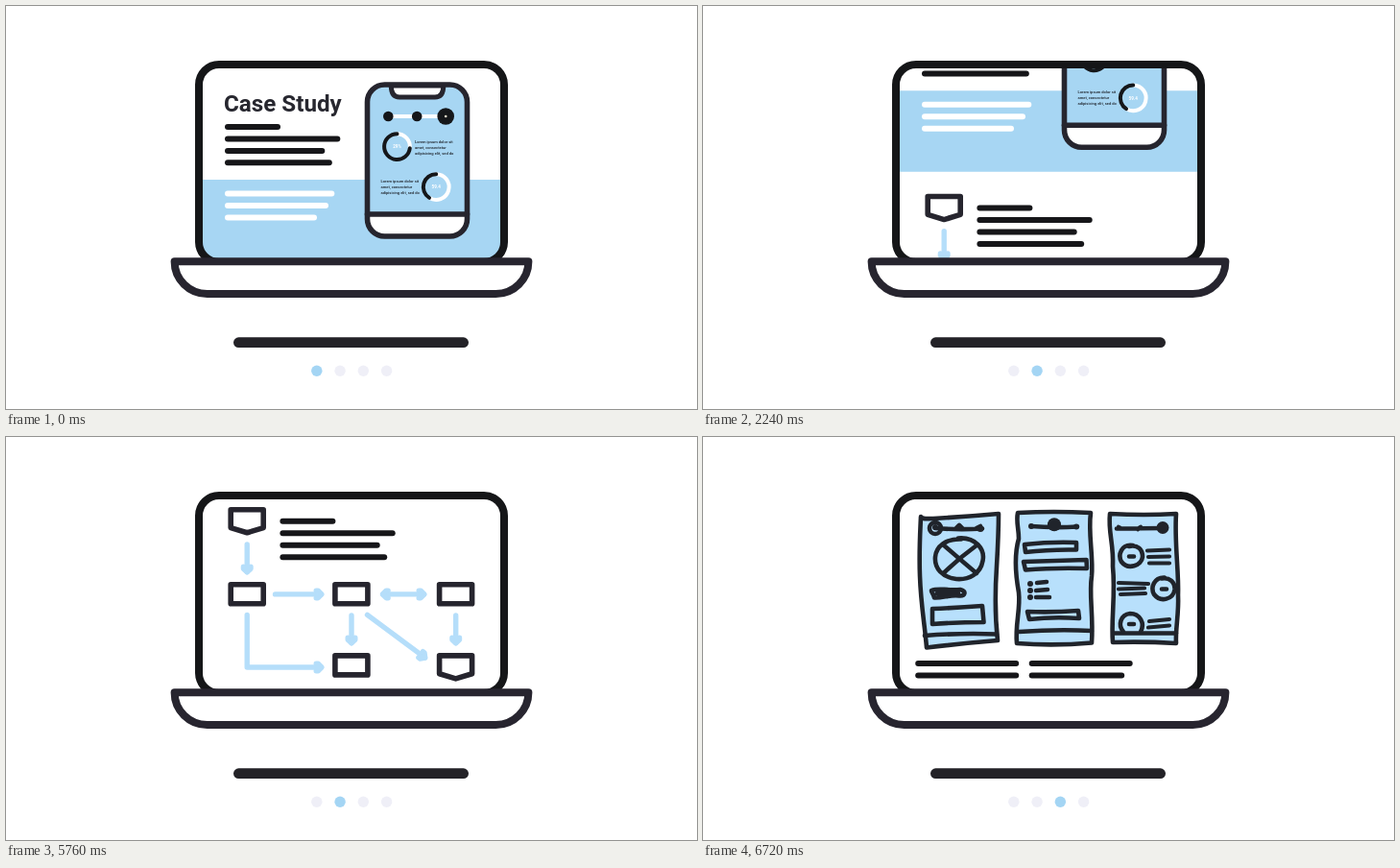
An HTML page for the animation above (8000 ms loop, 720x420 px).

```html
<!DOCTYPE html>
<html lang="en">
<head>
<meta charset="utf-8">
<title>Laptop case study</title>
<style>
  html, body { margin: 0; width: 100%; height: 100%; overflow: hidden; background: #fff; }
  svg { display: block; }
  path, line, circle, rect { stroke-linecap: round; stroke-linejoin: round; }
  .title { font: bold 24.2px Roboto, sans-serif; fill: #27272f; }
  .small { font: 500 4.05px Roboto, sans-serif; fill: #1b1f26; }
  .value { font: bold 4.6px Roboto, sans-serif; fill: #fff; text-anchor: middle; }
  .dark { fill: none; stroke: #26252e; stroke-width: 5.6; }
  .arrow { fill: none; stroke: #b5defa; stroke-width: 5.4; }
  .sketch { fill: none; stroke: #20242b; stroke-width: 4.6; }
  .card { fill: #b8e0fc; }
  .dot { fill: #20242b; }
</style>
</head>
<body>
<svg width="720" height="420" viewBox="0 0 720 420">
  <defs>
    <clipPath id="screen"><rect x="201" y="61" width="318" height="206" rx="21"/></clipPath>
    <path id="head" d="M-8.3-3.8h2L-2.6 0L-6.3 3.8h-2"/>
    <path id="box" d="M-17-10H17V10H-17Z"/>
    <path id="shield" d="M-17-10H17V8.8L0 14L-17 8.8Z"/>
  </defs>

  <g clip-path="url(#screen)">
    <g id="page">
      <g id="study">
        <rect x="200" y="181" width="320" height="84.5" fill="#a7d6f3"/>
        <text class="title" x="227" y="110.4">Case Study</text>
        <rect x="376.5" y="82" width="104" height="158" rx="18" fill="#fff"/>
        <path d="M376.5 217V100a18 18 0 0 1 18-18h68a18 18 0 0 1 18 18V217Z" fill="#a7d6f3"/>
        <path class="dark" d="M376.5 217H480.5"/>
        <path class="dark" style="fill:#fff;stroke-width:5" d="M401.3 83C401.3 91 404 95 410 95H447C453 95 455.8 91 455.8 83Z"/>
        <rect class="dark" x="376.5" y="82" width="104" height="158" rx="18"/>
        <path d="M398 115H458" stroke="#fff" stroke-width="4"/>
        <g fill="#15171a">
          <circle cx="398.3" cy="115" r="5.3"/>
          <circle cx="428.2" cy="115" r="5.3"/>
          <circle cx="458.2" cy="115" r="8.8"/>
        </g>
        <circle cx="458.2" cy="115" r="1.3" fill="#f3e9d0"/>
      </g>
      <g id="flow"></g>
      <g id="wire">
        <g class="sketch">
          <path class="card" d="M227 83C229 86 232 85 240 85Q275 83 308 80C308 100 307 118 306 135C304 165 304 185 307 212Q270 215 233 219.5C231 195 227 175 226 145C225 120 226 105 227 83Z"/>
          <path d="M231 207Q270 204 306 205.500M242 95Q266 97 291 95.500M264 95l3-3l3 3M285 95l4-2"/>
          <circle cx="242" cy="95" r="6"/>
          <path d="M266 105.500C284 104 294 117 291.500 129C289 143 277 149 264 148C249 146 241 137 242 125C243 114 253 106 269 106.500M250 112Q266 126 285 142M285 113Q267 126 250 142.500"/>
          <path d="M238 160C245 157 252 160 268 159C275 161 273 166 267 165.500C258 164 250 168 241 167.500C240 163 238 162 238 160ZM244 163H266"/>
          <path d="M239 179Q265 178 291 176L292.500 193Q265 193 239 195Z"/>

          <path class="card" d="M328 79Q365 77 404 79C401 100 407 125 405 145C402 165 407 185 405 214.500Q365 218 327 215C325 195 331 180 329 162C325 140 325 120 329 106C329 95 326 88 328 79Z"/>
          <path d="M329 203Q370 200 405 202M342 93Q365 95 390 93.500"/>
          <path d="M335 112Q362 109 389 110L389 117.500Q360 117 336 120ZM334 130Q370 129 399.500 128L400 137Q365 136 336 138.500Z"/>
          <path d="M348 152l10-1M347 160l12-1M347 167h14M338 182Q365 183 391 181L392 189Q365 187 340 190Z"/>

          <path class="card" d="M424 80Q460 82 493 80C491 110 496 140 495 165C496 185 492 200 493 215Q460 213 427 214C425 190 430 165 427 135C428 110 422 100 424 80Z"/>
          <path d="M428 204.500H493M431 95.500Q455 95 479 95M433 94l2 1M453 96l3-2"/>
          <path d="M448 113C436 111 432 123 436 130C443 139 457 134 458 125C458 117 453 112 444 114M444 124.500h5"/>
          <path d="M481 146.500C470 146 466 157 470 164C477 173 490 169 491.500 159C492 151 486 146 478 147.500M478 158.500h5"/>
          <path d="M438 203C432 196 435 185 445 184C455 184 461 194 456 203M444 195h5"/>
          <path style="stroke-width:4.200" d="M463 118.500l23-1M464 125l22-.5M465 131.500h21M433 152l31 1M433 158.500l27-1M435 164l26-1M465 192l21-2M464 198.500l22-2"/>
        </g>
        <g class="dot">
          <circle cx="242" cy="94" r="3"/><circle cx="267" cy="94.500" r="3"/><circle cx="289" cy="95.500" r="3.500"/>
          <circle cx="342" cy="93" r="3"/><circle cx="366" cy="91.300" r="7"/><circle cx="389" cy="93.500" r="3"/>
          <circle cx="341" cy="153" r="3"/><circle cx="341" cy="160" r="3"/><circle cx="341" cy="167" r="3"/>
          <circle cx="479" cy="94.500" r="6.500"/>
        </g>
      </g>
    </g>
  </g>

  <rect x="201" y="61" width="318" height="206" rx="21" fill="none" stroke="#151618" stroke-width="8"/>
  <path d="M175.600 266.300H544.400A34 33.700 0 0 1 510.400 300H209.600A34 33.700 0 0 1 175.600 266.300Z" fill="#fff" stroke="#27252f" stroke-width="8"/>
  <rect x="237" y="345.300" width="245" height="10.800" rx="5.400" fill="#232227"/>
  <g id="dots"></g>
</svg>

<script>
const LOOP = 8000, STEP = 80, SCROLL = 480, PAGE = 215.5;
const STARTS = [2080, 5760];
const $ = id => document.getElementById(id);
const add = (id, markup) => $(id).insertAdjacentHTML('beforeend', markup);

// A column of rounded bars, given their widths
const bars = (id, x, y, widths, color = '#161619') => widths.forEach((w, i) =>
  add(id, `<rect x="${x}" y="${y + i * 12.45 - 3}" width="${w}" height="6" rx="3" fill="${color}"/>`));

// A ring whose white part covers a share of the turn from the top
function ring(x, y, share, value) {
  const r = 13.4, a = share * 2 * Math.PI;
  const endX = x + r * Math.sin(a), endY = y - r * Math.cos(a);
  const big = share > 0.5 ? 1 : 0;
  const arc = (large, sweep, color) =>
    `<path d="M${x} ${y - r}A${r} ${r} 0 ${large} ${sweep} ${endX} ${endY}" fill="none" stroke="${color}" stroke-width="4"/>`;
  add('study', arc(big, 1, '#fff') + arc(1 - big, 0, '#15171a') +
    `<text class="value" x="${x}" y="${y + 1.7}">${value}</text>`);
}

const note = (x, y) => ['Lorem ipsum dolor sit', 'amet, consectetur', 'adipisicing elit, sed do'].forEach((s, i) =>
  add('study', `<text class="small" x="${x}" y="${y + i * 6.1}">${s}</text>`));

const head = (x, y, angle) => `<use href="#head" transform="translate(${x} ${y}) rotate(${angle})"/>`;

// An arrow through the points; the last one is the tip
function arrow(points, both) {
  const n = points.length, [x, y] = points[n - 1], [px, py] = points[n - 2];
  const turn = Math.atan2(y - py, x - px), cut = 3;
  const line = points.slice();
  line[n - 1] = [x - cut * Math.cos(turn), y - cut * Math.sin(turn)];
  let heads = head(x, y, turn * 180 / Math.PI);
  if (both) {
    heads += head(...points[0], 180);
    line[0] = [points[0][0] + cut, points[0][1]];
  }
  add('flow', `<g class="arrow"><path d="M${line.join('L')}"/>${heads}</g>`);
}

const node = (shape, x, y) => add('flow', `<use class="dark" href="#${shape}" x="${x}" y="${y}"/>`);

const paragraph = [58, 120.3, 104.3, 111.8];
bars('study', 228, 126, paragraph);
bars('study', 228, 195.6, [114.3, 108, 96], '#fff');
ring(407.5, 146.6, 0.27, '29%');
ring(448.2, 188.6, 0.59, '59.4');
note(426, 142.6);
note(390.5, 183.8);

bars('flow', 285.4, 87.8, paragraph);
node('shield', 251.2, 85.8);
node('box', 251.2, 163.8);
node('box', 359.9, 163.8);
node('box', 468.6, 163.8);
node('box', 359.9, 237.9);
node('shield', 468.6, 237.9);
arrow([[251.2, 112], [251.2, 143.5]]);
arrow([[280.5, 163.9], [331.5, 163.9]]);
arrow([[389.8, 163.9], [438.5, 163.9]], true);
arrow([[360, 186], [360, 217.5]]);
arrow([[468.7, 186], [468.7, 217.5]]);
arrow([[376.5, 185.3], [438.8, 231.7]]);
arrow([[251.2, 185.5], [251.2, 240], [331.5, 240]]);

bars('wire', 221.2, 236.1, [108, 108]);
bars('wire', 339.7, 236.1, [108, 99.5]);

$('flow').setAttribute('transform', `translate(0 ${PAGE})`);
$('wire').setAttribute('transform', `translate(0 ${2 * PAGE})`);
for (let i = 0; i < 4; i++) add('dots', `<circle cx="${323.8 + i * 24.27}" cy="380.2" r="5.7"/>`);

const ease = p => p + p * (1 - p) * (0.21 + 0.68 * p);

function draw(now) {
  const t = Math.floor(now % LOOP / STEP) * STEP;
  let pos = 0, active = 0;
  for (const start of STARTS) {
    const p = Math.min(1, Math.max(0, (t - start) / SCROLL));
    pos += ease(p);
    if (p > 0) active++;
  }
  $('page').setAttribute('transform', `translate(0 ${-pos * PAGE})`);
  [...$('dots').children].forEach((dot, i) => dot.setAttribute('fill', i === active ? '#a4d5f4' : '#efeff7'));
}

const begin = performance.now();
function tick() {
  draw(performance.now() - begin);
  requestAnimationFrame(tick);
}
tick();
</script>
</body>
</html>
```
